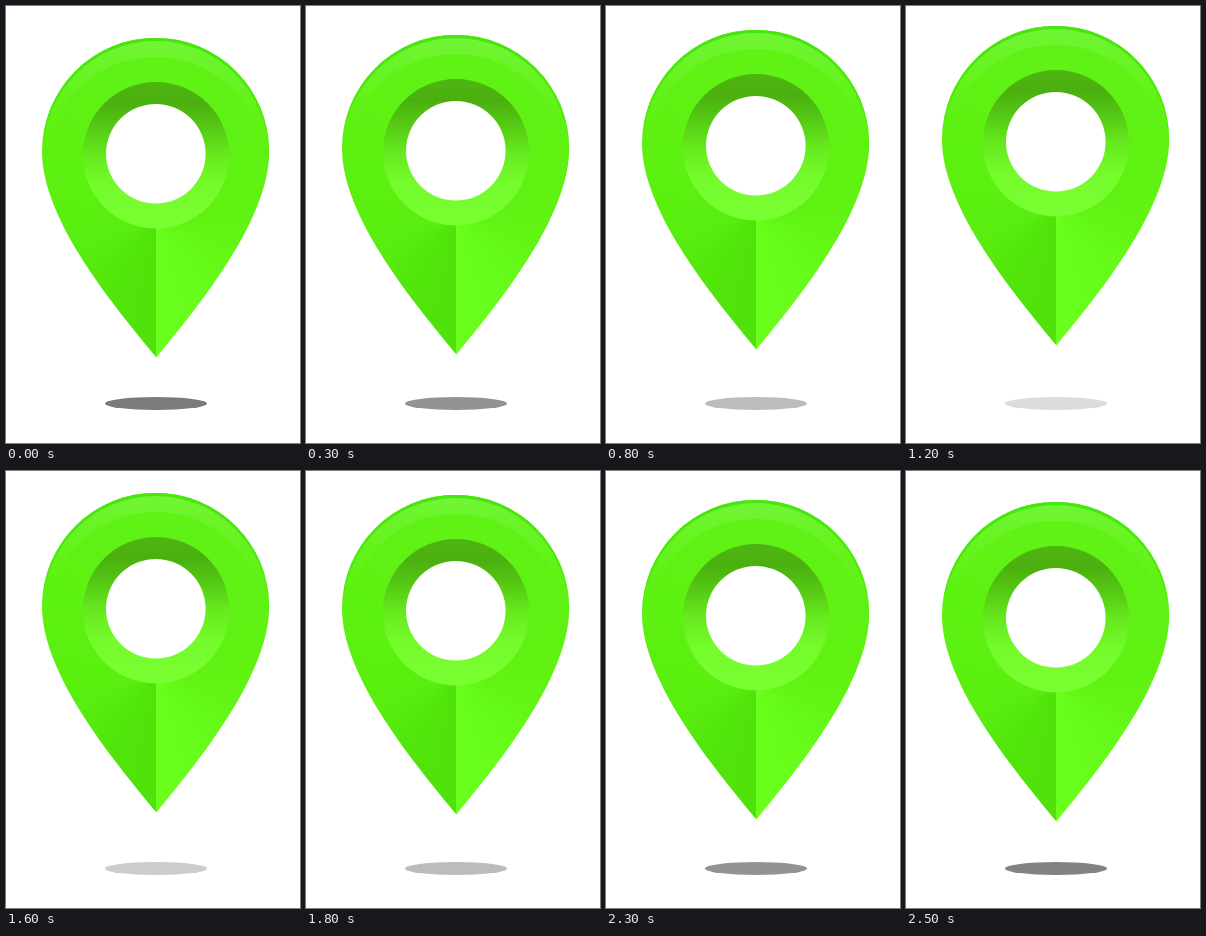
Write an HTML page with a canvas that moves like this. It is 294 px wide and 437 px high and loops after 2.6 s.

```html
<!DOCTYPE html>
<html lang="en">
<head>
<meta charset="utf-8">
<title>Map pin</title>
<style>
html, body { margin: 0; width: 100%; height: 100%; overflow: hidden; background: #fff; }
canvas { display: block; }
</style>
</head>
<body>
<canvas id="stage" width="294" height="437"></canvas>
<script>
const ctx = document.getElementById('stage').getContext('2d');
const STEP = 100, STEPS = 26, TOP_STEP = 13;
const TAU = Math.PI * 2;

function withStops(gradient, stops) {
  for (const [at, color] of stops) gradient.addColorStop(at, color);
  return gradient;
}

function disc(x, y, r, fill) {
  ctx.beginPath();
  ctx.arc(x, y, r, 0, TAU);
  ctx.fillStyle = fill;
  ctx.fill();
}

const body = new Path2D(
  'M36 145.5 A113.6 113.6 0 0 1 263.2 145.5 C263.2 215 191 302 150.5 351.5 C110 302 36 215 36 145.5Z');

// Shading turns around the pin, with a hard fold below the ring.
const bodyFill = withStops(ctx.createConicGradient(Math.PI / 2, 150, 210), [
  [0, '#4fe109'], [0.1, '#53e60b'], [0.19, '#5aee10'], [0.3, '#5cf010'],
  [0.5, '#60f215'], [0.7, '#5ff112'], [0.8, '#61f414'], [0.88, '#66fa19'], [1, '#6bff1e']
]);

const ringFill = withStops(ctx.createLinearGradient(0, 76, 0, 222), [
  [0, '#4db511'], [0.15, '#4bb00f'], [0.3, '#54c713'], [0.5, '#66e91e'],
  [0.7, '#74fb2b'], [1, '#7bff34']
]);

const glowFill = withStops(ctx.createLinearGradient(0, 32, 0, 125), [
  [0, 'rgba(120,246,66,.75)'], [0.35, 'rgba(116,246,56,.5)'], [1, 'rgba(110,246,40,0)']
]);

const edgeFill = withStops(ctx.createLinearGradient(0, 32, 0, 150), [
  [0, '#46e60e'], [0.6, '#4de90e'], [1, 'rgba(80,235,14,0)']
]);

// Area of the body outside a circle, used for the bevel at the top.
function crescent(x, y, r, fill) {
  ctx.beginPath();
  ctx.rect(0, 0, 294, 150);
  ctx.arc(x, y, r, 0, TAU);
  ctx.fillStyle = fill;
  ctx.fill('evenodd');
}

function drawShadow(lift) {
  const gray = 123 + 8.1 * lift;
  ctx.beginPath();
  ctx.ellipse(150, 397.5, 51, 6.5, 0, 0, TAU);
  ctx.fillStyle = `rgb(${gray},${gray},${gray})`;
  ctx.fill();
}

function drawPin() {
  ctx.fillStyle = bodyFill;
  ctx.fill(body);
  ctx.save();
  ctx.clip(body);
  ctx.beginPath();
  ctx.rect(0, 0, 294, 150);
  ctx.clip();
  crescent(149.6, 160, 109, glowFill);
  crescent(149.6, 147.5, 112.5, edgeFill);
  ctx.restore();
  disc(150, 149.2, 73.2, ringFill);
  disc(149.8, 147.8, 49.8, '#fff');
}

function frame(now) {
  const step = Math.floor(now / STEP) % STEPS;
  const lift = TOP_STEP - Math.abs(step - TOP_STEP);
  ctx.clearRect(0, 0, 294, 437);
  drawShadow(lift);
  ctx.save();
  ctx.translate(0, -lift);
  drawPin();
  ctx.restore();
  requestAnimationFrame(frame);
}

const start = performance.now();
requestAnimationFrame(() => frame(0));
function loop() {}
</script>
</body>
</html>
```
